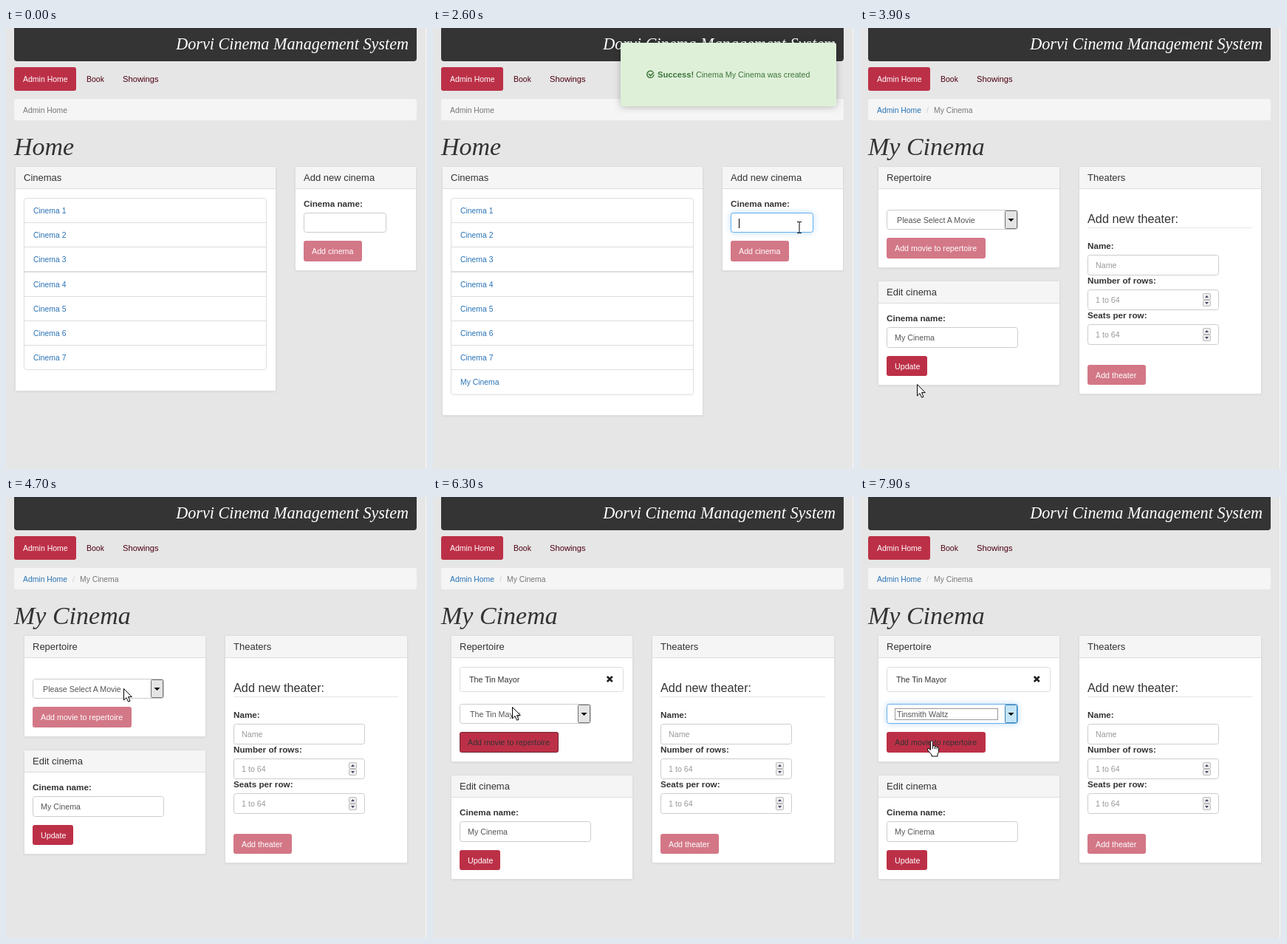
An HTML page that plays this animation: 570 px wide and 597 px high, repeating every 8 s.

```html
<!DOCTYPE html>
<html lang="en">
<head>
<meta charset="utf-8">
<title>Cinema management</title>
<style>
  html, body { margin: 0; width: 100%; height: 100%; overflow: hidden; background: #e6e6e6; }
  svg { display: block; width: 570px; height: 597px; }
  text { font: 10.7px "Liberation Sans", Arial, sans-serif; fill: #333; white-space: pre; }
  .link { font-size: 10.4px; fill: #2a73b5; }
  .nav { font-size: 10.5px; fill: #4d0012; }
  .muted { font-size: 10.4px; fill: #777; }
  .label { font-size: 11.7px; font-weight: bold; }
  .head { font-size: 13px; }
  .sub { font-size: 16.3px; }
  .title { font: italic 34px "Liberation Serif", "Times New Roman", serif; }
  .brand { font: italic 22.2px "Liberation Serif", "Times New Roman", serif; fill: #fff; text-anchor: end; }
  .white { fill: #fff; }
  .field { fill: #555; }
  .hint { fill: #999; }
  .toast { fill: #3c763d; }
  .panel { filter: drop-shadow(0 1px 1px rgba(0, 0, 0, .06)); }
  .glow { filter: drop-shadow(0 0 4px rgba(102, 175, 233, .45)); }
  .lifted { filter: drop-shadow(0 1px 5px rgba(0, 0, 0, .25)); }
</style>
</head>
<body>
<svg id="stage" viewBox="0 0 570 597"></svg>
<script>
const LOOP = 8000;
const RED = '#bc3047', LINE = '#ddd', FOCUS = '#66afe9';
const MOVIES = ['Please Select A Movie', 'The Tin Mayor', "Six Boats Past the Miller's Gate",
  'Tinsmith Waltz', 'The Plum Door', "Morton Quigsby's Big Nap", 'The Gull Bay Memo', 'Ochre'];
const [PROMPT, FIRST, , SECOND] = MOVIES;
const LATER = MOVIES.filter(name => name !== FIRST);

const text = (x, y, string, cls = '') => `<text x="${x}" y="${y}" class="${cls}">${string}</text>`;
const rect = (x, y, w, h, fill, r = 0, more = '') =>
  `<rect x="${x}" y="${y}" width="${w}" height="${h}" rx="${r}" fill="${fill}" ${more}/>`;
const frame = (x, y, w, h, stroke, r = 3, fill = '#fff', more = '') =>
  rect(x + .5, y + .5, w - 1, h - 1, fill, r, `stroke="${stroke}" ${more}`);
const path = (d, more = '') => `<path d="${d}" fill="none" ${more}/>`;
const move = (x, y, body) => `<g transform="translate(${x} ${y})">${body}</g>`;

// Visible only during the listed [from, to] spans.
const during = (spans, body) => `<g data-spans='${JSON.stringify(spans)}'>${body}</g>`;

const panel = (x, y, w, h, heading) =>
  `<g class="panel">${frame(x, y, w, h, LINE, 2)}</g>` +
  rect(x + 1, y + 1, w - 2, 30, '#f5f5f5', 1) + rect(x + 1, y + 30, w - 2, 1, LINE) +
  text(x + 12, y + 20, heading, 'head');

const button = (x, y, w, h, label, { off = false, cls = 'white' } = {}) =>
  `<g opacity="${off ? .65 : 1}">${rect(x, y, w, h, RED, 3)}${text(x + 11, y + 18, label, cls)}</g>`;

const input = (x, y, w, value = '', cls = 'field') =>
  frame(x, y, w, 28, '#ccc') + text(x + 11, y + 18, value, cls);

const spinner = y => frame(464, y, 11, 9, '#bbb', 1, '#eee') + frame(464, y + 9, 11, 9, '#bbb', 1, '#eee') +
  path(`M467 ${y + 6}l2.5 -3l2.5 3zM467 ${y + 12}l2.5 3l2.5 -3z`, 'style="fill:#446"');

const select = (y, value, focused) =>
  `<g class="${focused ? 'glow' : ''}">${frame(36, y, 178, 27, focused ? FOCUS : '#ccc')}</g>` +
  frame(196, y + 1, 17, 25, focused ? '#3c7fb1' : '#707070', 1, focused ? '#c4e5f6' : '#e4e4e4') +
  path(`M200.5 ${y + 12}h8l-4 4z`, 'style="fill:#000"') +
  (focused ? frame(47, y + 6, 140, 16, '#333', 0, 'none', 'stroke-dasharray="1 1"') : '') +
  text(50, y + 18, value, 'field');

const dropdown = (y, names, active) =>
  frame(36, y, 189, names.length * 14 + 2, '#222', 0) +
  rect(37, y + 1 + active * 14, 187, 14, '#39f') +
  names.map((name, i) => text(39, y + 12 + i * 14, name, i === active ? 'white' : 'field')).join('');

const chrome = rect(0, 0, 570, 597, '#e6e6e6') + rect(568, 0, 1, 597, '#f8f8f8') +
  rect(11, -6, 545, 51, '#343434', 4) + text(545, 29, 'Dorvi Cinema Management System', 'brand') +
  rect(11, 53, 84, 32, RED, 3) + text(23, 73, 'Admin Home', 'nav white') +
  text(109, 73, 'Book', 'nav') + `<text x="158" y="73" class="nav" style="font-size:11.2px">Showings</text>` +
  rect(11, 96, 545, 29, '#f5f5f5', 3);

function cinemaList(count) {
  const rowY = i => Math.round(230 + 33.2 * i);
  let out = panel(12, 187, 354, 305 + (count - 7) * 33, 'Cinemas') +
    frame(24, 230, 329, rowY(count) - 229, LINE);
  for (let i = 0; i < count; i++) {
    if (i) out += rect(25, rowY(i) - (i === 3 ? 1 : 0), 327, i === 3 ? 2 : 1, LINE);
    out += text(37, rowY(i) + 21, i < 7 ? `Cinema ${i + 1}` : 'My Cinema', 'link');
  }
  return out;
}

const typed = [[1100, 'M'], [1400, 'My'], [1500, 'My '], [1700, 'My C'],
  [2000, 'My Ci'], [2100, 'My Cine'], [2200, 'My Cinema'], [2600, '']];
const caret = '<line class="caret" x1="414.5" x2="414.5" y1="258" y2="271" stroke="#000"/>';
const typing = typed.slice(0, -1).map(([at, word], i) =>
  during([[at, typed[i + 1][0]]], text(414, 268, word, 'field') + caret)).join('');

const toast = `<g class="lifted">${rect(254, 20, 292, 86, '#dff0d8', 3)}</g>` +
  path('M297.6 59.4A4.6 4.6 0 1 0 299 63', 'stroke="#3c763d" stroke-width="1.5"') +
  path('M292 62l2.5 2.5l4.5 -4.5', 'stroke="#3c763d" stroke-width="1.7"') +
  `<text x="304" y="67" class="toast" font-weight="bold" style="font-weight:bold;font-size:11.2px">Success!</text>` +
  text(356, 67, 'Cinema My Cinema was created', 'toast');

const home = text(23, 115, 'Admin Home', 'muted') + text(11, 172, 'Home', 'title') +
  during([[0, 2600]], cinemaList(7)) + during([[2600, 3900]], cinemaList(8)) +
  panel(391, 187, 165, 142, 'Add new cinema') + text(403, 242, 'Cinema name:', 'label') +
  frame(403, 250, 112, 27, '#ccc') +
  during([[500, 2600]], frame(403, 250, 112, 27, FOCUS)) +
  during([[2600, 3900]], `<g class="glow">${frame(403, 250, 112, 27, FOCUS)}</g>`) +
  during([[500, 1100], [2600, 3700]], caret) + typing +
  during([[0, 1100], [2600, 3900]], button(403, 288, 79, 28, 'Add cinema', { off: true })) +
  during([[1100, 2600]], button(403, 288, 79, 28, 'Add cinema')) +
  during([[3700, 3900]], `<text x="37" y="483" class="link" style="fill:#23527c;text-decoration:underline">My Cinema</text>`) +
  during([[3800, 3900]], frame(37, 473, 52, 13, '#333', 0, 'none', 'stroke-dasharray="1 1"')) +
  during([[2600, 3900]], toast);

const editPanel = panel(24, 342, 247, 142, 'Edit cinema') + text(36, 397, 'Cinema name:', 'label') +
  input(36, 405, 178, 'My Cinema') + button(36, 444, 55, 27, 'Update');

const theaters = panel(296, 187, 248, 309, 'Theaters') + text(308, 264, 'Add new theater:', 'sub') +
  rect(308, 270, 223, 1, '#e5e5e5') +
  text(308, 299, 'Name:', 'label') + input(308, 307, 178, 'Name', 'hint') +
  text(308, 346, 'Number of rows:', 'label') + input(308, 354, 178, '1 to 64', 'hint') + spinner(359) +
  text(308, 393, 'Seats per row:', 'label') + input(308, 401, 178, '1 to 64', 'hint') + spinner(406) +
  button(308, 456, 79, 27, 'Add theater', { off: true });

const addMovie = (y, options) => button(36, y, 134, 28, 'Add movie to repertoire', options);

const beforeAdd = panel(24, 187, 247, 138, 'Repertoire') + editPanel +
  during([[3900, 4800]], select(246, PROMPT)) +
  during([[4800, 5600]], select(246, PROMPT, true)) +
  during([[5600, 6000]], select(246, FIRST, true)) +
  during([[6000, 6100]], select(246, FIRST)) +
  during([[3900, 5600]], addMovie(284, { off: true })) +
  during([[5600, 6100]], addMovie(284, { cls: '' })) +
  during([[4900, 5300]], dropdown(273, MOVIES, 0)) +
  during([[5300, 5600]], dropdown(273, MOVIES, 1));

const afterAdd = panel(24, 187, 247, 172, 'Repertoire') + move(0, 34, editPanel) +
  frame(36, 230, 222, 34, LINE) + text(49, 251, FIRST) +
  path('M235.8 243l7 7m0 -7l-7 7', 'stroke="#222" stroke-width="2.6"') +
  during([[6100, 6500]], select(280, FIRST)) +
  during([[6500, 7600]], select(280, PROMPT, true)) +
  during([[7600, 8000]], select(280, SECOND, true)) +
  addMovie(318, { cls: '' }) +
  during([[6100, 6500]], frame(36, 318, 134, 28, '#222', 3, 'none', 'stroke-dasharray="1 1"')) +
  during([[6700, 7300]], dropdown(307, LATER, 0)) +
  during([[7300, 7400]], dropdown(307, LATER, 1)) +
  during([[7400, 7600]], dropdown(307, LATER, 2));

const cinema = text(23, 115, 'Admin Home', 'link') +
  `<text x="90" y="115" class="muted" style="fill:#ccc">/</text>` + text(100, 115, 'My Cinema', 'muted') +
  text(11, 172, 'My Cinema', 'title') + theaters +
  during([[3900, 6100]], beforeAdd) + during([[6100, 8000]], afterAdd);

const outline = 'stroke="#000" style="fill:#fff" stroke-linejoin="round"';
const pointer = '<g id="pointer">' +
  during([[100, 3000]], path('M-3 -7.5h2.5q.5 0 .5 .5q0 -.5 .5 -.5h2.5M0 -7v14M-3 7.5h2.5q.5 0 .5 -.5q0 .5 .5 .5h2.5', 'stroke="#000"')) +
  during([[3000, 5700], [6100, 7900]], path('M.5 .5V16L4 12.6L6.6 18.2L9 17.2L6.5 11.6H11.3Z', outline)) +
  during([[5700, 6100], [7900, 8000]], path('M-1.6 1Q0 -1.5 1.6 1V7Q3.4 5.5 4.5 7.6Q6.2 6.6 7.2 8.4Q9.4 7.6 9.5 10V14.5Q9.5 16 8 18V21H0V19L-5.2 13Q-6.5 10 -4 10.3L-1.6 12.5ZM1.6 7v4M4.5 7.6v3.6M7.2 8.4v3', outline)) +
  '</g>';

const stage = document.getElementById('stage');
stage.innerHTML = chrome + during([[0, 3900]], home) + during([[3900, 8000]], cinema) + pointer;

// Place each caret after its text.
stage.querySelectorAll('.caret').forEach(line => {
  const word = line.previousElementSibling;
  if (word?.tagName !== 'text') return;
  const x = Math.round(414 + word.getComputedTextLength()) + .5;
  line.setAttribute('x1', x);
  line.setAttribute('x2', x);
});

const timing = { duration: LOOP, iterations: Infinity };
const start = document.timeline.currentTime ?? 0;
const play = (element, frames) => { element.animate(frames, timing).startTime = start; };

stage.querySelectorAll('[data-spans]').forEach(group => {
  const spans = JSON.parse(group.dataset.spans);
  const frames = spans[0][0] ? [{ offset: 0, opacity: 0 }] : [];
  for (const [from, to] of spans) {
    frames.push({ offset: from / LOOP, opacity: 1 });
    frames.push({ offset: to / LOOP, opacity: to < LOOP ? 0 : 1 });
  }
  if (frames.at(-1).offset < 1) frames.push({ offset: 1, opacity: 0 });
  play(group, frames.map(step => ({ ...step, easing: 'step-end' })));
});

// Pointer stops: time, x, y. It advances once every 100 ms.
const stops = [[0, 502, 248], [100, 502, 248], [700, 496, 270], [2900, 496, 270], [3200, 362, 315],
  [3400, 155, 430], [3500, 138, 442], [3600, 105, 467], [3800, 77, 482], [4000, 77, 482],
  [4300, 118, 390], [4500, 152, 290], [4700, 159, 259], [5000, 159, 259], [5300, 118, 289],
  [5400, 114, 292], [5600, 114, 292], [6000, 110, 298], [6300, 107, 284], [6500, 112, 290],
  [7000, 112, 292], [7400, 83, 348], [7800, 83, 348], [7900, 97, 330], [8000, 97, 330]];
play(document.getElementById('pointer'), stops.map(([at, x, y], i) => ({
  offset: at / LOOP,
  transform: `translate(${x}px, ${y}px)`,
  easing: i + 1 < stops.length ? `steps(${(stops[i + 1][0] - at) / 100})` : 'linear'
})));
</script>
</body>
</html>
```
